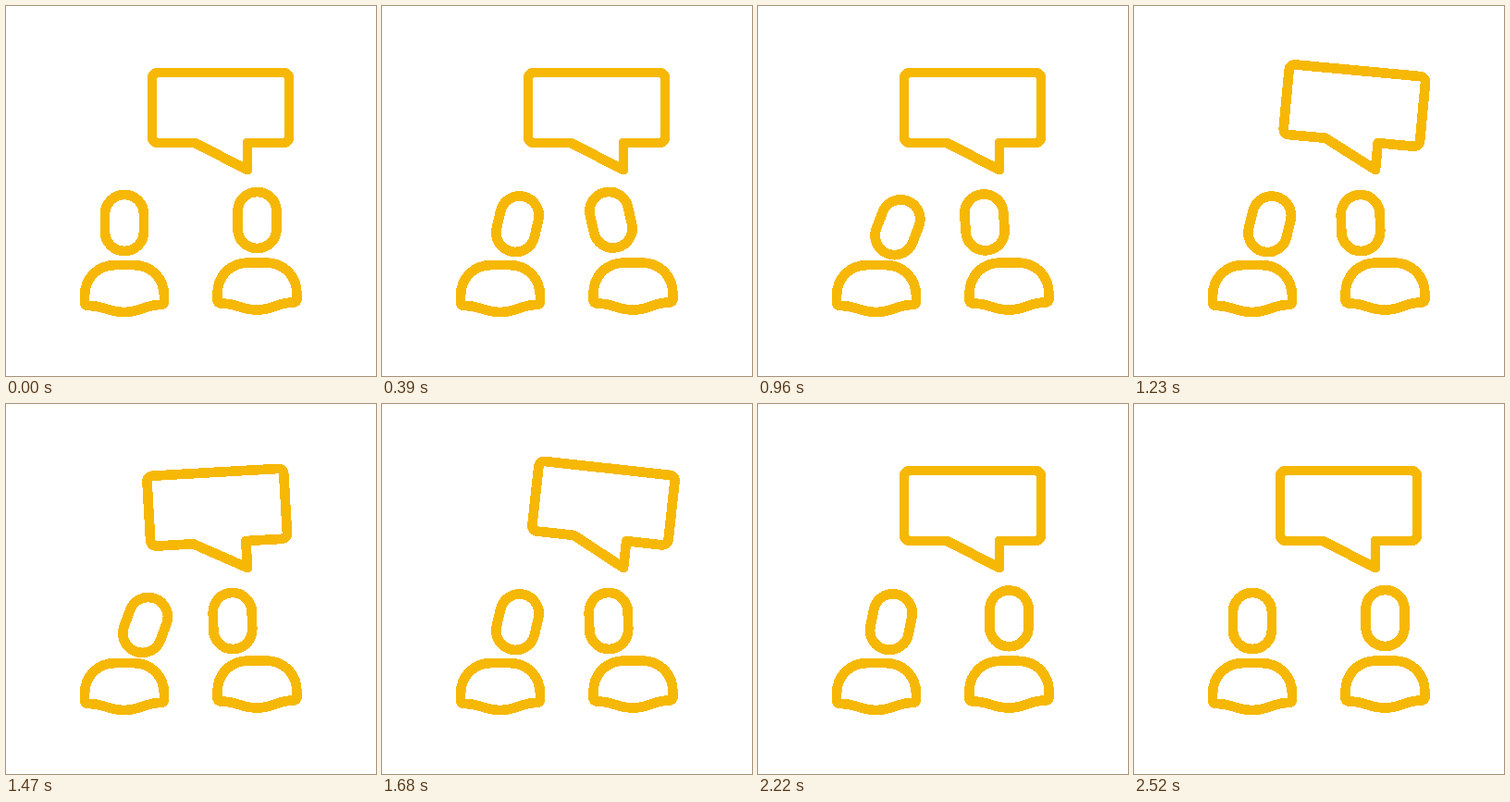
These frames come from a looping animation (400x400 px, 4050 ms). An HTML page:

```html
<!DOCTYPE html>
<html lang="en">
<head>
<meta charset="utf-8">
<title>Conversation</title>
<style>
  html, body { margin: 0; width: 100%; height: 100%; overflow: hidden; background: #fff; }
  svg { display: block; width: 100%; height: 100%; }
</style>
</head>
<body>
<svg viewBox="0 0 400 400" fill="none" stroke="#f6b804" stroke-width="10.7" stroke-linejoin="round" shape-rendering="crispEdges">
  <defs>
    <rect id="head" x="-21" y="-30.5" width="42" height="61" rx="21"/>
    <!-- origin at the middle of the bottom edge -->
    <path id="body" d="M-43 -17C-43 -37 -29 -51 -9 -51H9C29 -51 43 -37 43 -17V-12Q43 -8 39 -8C21 -8 18 0 0 0C-18 0 -21 -7 -39 -7Q-43 -7 -43 -11Z"/>
  </defs>
  <!-- origin at the tip of the tail -->
  <path id="bubble" d="M-96 -105H38Q45 -105 45 -98V-36Q45 -29 38 -29H0V0L-57 -29H-96Q-103 -29 -103 -36V-98Q-103 -105 -96 -105Z"/>
  <use href="#body" transform="translate(128 331)"/>
  <use id="rightBody" href="#body"/>
  <use id="leftHead" href="#head"/>
  <use id="rightHead" href="#head"/>
</svg>
<script>
const LOOP = 4050, STEP = 30;

const part = (t, from, to) => Math.min(1, Math.max(0, (t - from) / (to - from)));
// Eased 0 to 1, and a smooth pulse 0 to 1 to 0.
const ramp = (t, from, to) => (1 - Math.cos(Math.PI * part(t, from, to))) / 2;
const pulse = (t, from, to) => Math.sin(Math.PI * part(t, from, to)) ** 2;

function place(id, x, y, angle, squash = 0) {
  const scale = `scale(${1 + 0.03 * squash} ${1 - 0.035 * squash})`;
  document.getElementById(id).setAttribute("transform", `translate(${x} ${y}) rotate(${angle}) ${scale}`);
}

function draw(t) {
  // The left head leans in, nods twice and straightens up.
  const lean = ramp(t, 30, 390) - ramp(t, 2130, 2500);
  const nod = pulse(t, 750, 1200) + pulse(t, 1200, 1650);
  place("leftHead", 128 + 18.5 * lean + 4.5 * nod, 234.5 + 1.2 * lean + 3.6 * nod, 13 * lean + 8 * nod);

  // The right person moves over with a sway, and bounces both ways.
  const turn = ramp(t, 30, 480) - ramp(t, 1740, 2150);
  const sway = ramp(t, 30, 390) - ramp(t, 540, 1140);
  const squash = pulse(t, 30, 390) + pulse(t, 1740, 2280);
  place("rightHead", 271.5 - 26.5 * turn, 231.5 + 3 * (turn - sway + squash),
    2 * squash - 1.5 * turn - 11.5 * sway, squash);
  place("rightBody", 271.5, 328.5, 0, squash);

  // The bubble shakes about the tip of its tail.
  const force = ramp(t, 1080, 1200) - ramp(t, 1650, 2100);
  place("bubble", 261, 177, 13.3 * force * Math.sin(2 * Math.PI * (t - 1032) / 456));
}

const start = performance.now();
function tick(now) {
  const t = Math.max(0, now - start) % LOOP;
  draw(Math.floor(t / STEP) * STEP);
  requestAnimationFrame(tick);
}
draw(0);
requestAnimationFrame(tick);
</script>
</body>
</html>
```
